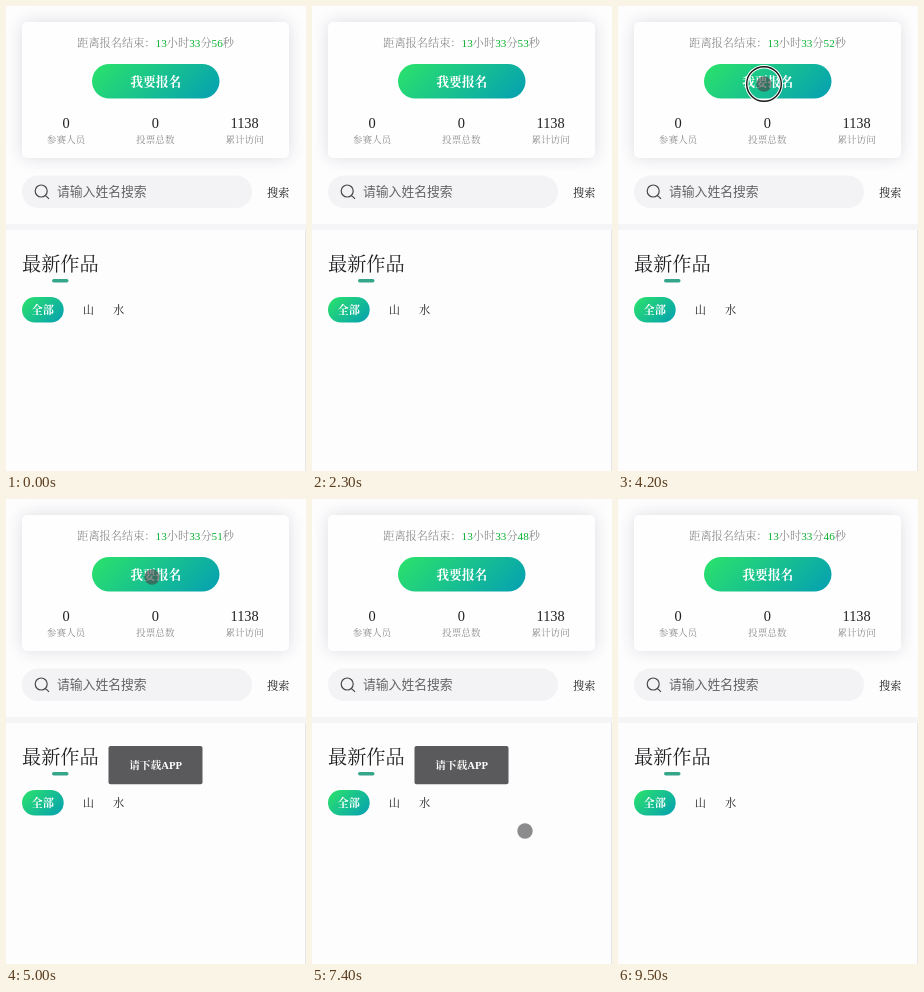
These frames come from a looping animation (300 by 465 pixels, 9600 ms). An HTML page with a canvas:

```html
<!DOCTYPE html>
<html lang="zh-CN">
<head>
<meta charset="utf-8">
<style>
html, body { margin: 0; width: 100%; height: 100%; overflow: hidden; background: #fdfdfe; }
canvas { display: block; width: 300px; height: 465px; }
</style>
</head>
<body>
<canvas id="stage"></canvas>
<script>
const W = 300, H = 465, LOOP = 9600, STEP = 100;
const SERIF = '"Liberation Serif", "Noto Serif CJK SC", "Noto Sans CJK SC", "Noto Sans CJK", serif';
const SANS = '"Noto Sans CJK SC", "Noto Sans CJK", sans-serif';
const INK = '#202022', GREY = '#8b8b8e';

const canvas = document.getElementById('stage');
const ctx = canvas.getContext('2d');
const ratio = window.devicePixelRatio || 1;
canvas.width = W * ratio;
canvas.height = H * ratio;
ctx.scale(ratio, ratio);

// Pointer stops: time, x, y
const enter = [[2800, 194, 406], [2900, 190, 388], [3000, 178, 284], [3100, 161, 146], [3200, 151, 78]];
const leave = [[7000, 146, 78], [7200, 176, 196], [7400, 213, 332], [7900, 223, 420], [8200, 236, 464], [8400, 241, 482]];

function along(path, t) {
  if (t <= path[0][0]) return path[0].slice(1);
  for (let i = 1; i < path.length; i++) {
    const [t0, x0, y0] = path[i - 1], [t1, x1, y1] = path[i];
    if (t <= t1) {
      const k = (t - t0) / (t1 - t0);
      return [x0 + (x1 - x0) * k, y0 + (y1 - y0) * k];
    }
  }
  return path[path.length - 1].slice(1);
}

function box(x, y, w, h, r, fill) {
  ctx.fillStyle = fill;
  ctx.beginPath();
  ctx.roundRect(x, y, w, h, r);
  ctx.fill();
}

function disc(x, y, r) {
  ctx.beginPath();
  ctx.arc(x, y, r, 0, Math.PI * 2);
}

// y is the vertical middle of the line
function text(str, x, y, size, color, { align = 'center', weight = 400, family = SERIF } = {}) {
  ctx.font = `${weight} ${size}px ${family}`;
  ctx.textAlign = align;
  ctx.fillStyle = color;
  ctx.fillText(str, x, y + size * 0.37);
}

function greenFill(x, y, w, h) {
  const cx = x + w / 2, cy = y + h / 2, d = (w + h) / 4;
  const g = ctx.createLinearGradient(cx - d, cy - d, cx + d, cy + d);
  g.addColorStop(0, '#2be36a');
  g.addColorStop(1, '#059fb3');
  return g;
}

function pill(x, y, w, h) {
  box(x, y, w, h, h / 2, greenFill(x, y, w, h));
}

function drawCountdown(t) {
  const size = 11.2;
  const seconds = 56 - Math.floor((t + 700) / 1000);
  const parts = [['距离报名结束：', 7], ['13', 1], ['小时', 2], ['33', 1], ['分', 1], [String(seconds), 1], ['秒', 1]];
  let x = 71.2;
  parts.forEach(([str, ems], i) => {
    text(str, x, 37.3, size, i % 2 ? '#08b02f' : GREY, { align: 'left' });
    x += ems * size;
  });
}

function drawCard(t) {
  ctx.save();
  ctx.shadowColor = 'rgba(40, 40, 60, 0.15)';
  ctx.shadowBlur = 16 * ratio;
  box(16, 16, 267, 136, 5, '#fefefe');
  ctx.restore();
  drawCountdown(t);
  pill(86, 58, 127.5, 34.5);
  text('我要报名', 149.8, 75.3, 12.8, '#fff', { weight: 700 });
  [['0', '参赛人员', 60], ['0', '投票总数', 149.3], ['1138', '累计访问', 238.6]].forEach(([num, label, x]) => {
    text(num, x, 116.3, 14.4, INK);
    text(label, x, 133.2, 9.6, GREY);
  });
}

function drawSearch() {
  box(16, 169.5, 230, 32.5, 16.25, '#f3f3f5');
  ctx.strokeStyle = '#48484b';
  ctx.lineWidth = 1.2;
  disc(35.2, 185, 6);
  ctx.moveTo(39.5, 189.3);
  ctx.lineTo(43, 192.8);
  ctx.stroke();
  text('请输入姓名搜索', 51, 185.7, 12.8, '#636366', { align: 'left', family: SANS });
  text('搜索', 272.2, 186.4, 11.2, INK);
}

function drawWorks() {
  box(0, 218, W, 6, 0, '#f5f4f6');
  text('最新作品', 16, 257.8, 19.2, INK, { align: 'left', weight: 500 });
  box(46, 273, 16.5, 3.4, 1.7, '#35a68a');
  pill(16, 291, 41.7, 25.6);
  text('全部', 36.8, 304, 11.2, '#fff', { weight: 700 });
  text('山', 82.3, 304, 11.2, INK);
  text('水', 112.7, 304, 11.2, INK);
  box(299, 224, 1, H - 224, 0, '#e6e6e8');
}

function drawToast() {
  box(102.5, 247, 94, 38.3, 2, '#5a595b');
  text('请下载APP', 149.6, 266.3, 10.7, '#fff', { weight: 700 });
}

function drawArrow(x, y) {
  ctx.beginPath();
  [[0, 0], [0, 11], [2.5, 8.8], [4.3, 12.8], [6.3, 11.9], [4.6, 8], [8, 8]]
    .forEach(([dx, dy]) => ctx.lineTo(x + dx, y + dy));
  ctx.closePath();
  ctx.fillStyle = '#111';
  ctx.strokeStyle = '#fff';
  ctx.lineWidth = 1;
  ctx.fill();
  ctx.stroke();
}

function drawTouch(x, y) {
  disc(x, y, 7.7);
  ctx.fillStyle = 'rgba(70, 68, 70, 0.62)';
  ctx.fill();
}

function drawRing(x, y) {
  [['#fff', 3.4], ['#171717', 1.4]].forEach(([color, width]) => {
    disc(x, y, 17.3);
    ctx.strokeStyle = color;
    ctx.lineWidth = width;
    ctx.stroke();
  });
}

function drawPointer(t) {
  if (t >= 2800 && t < 3500) drawArrow(...along(enter, t));
  else if (t >= 3500 && t < 8500) {
    const [x, y] = along(leave, t);
    drawTouch(x, y);
    if (t >= 4100 && t < 4400) drawRing(x, y);
  }
}

function draw(now) {
  const t = Math.floor((now % LOOP) / STEP) * STEP;
  ctx.fillStyle = '#fdfdfe';
  ctx.fillRect(0, 0, W, H);
  drawCard(t);
  drawSearch();
  drawWorks();
  if (t >= 4500 && t < 7600) drawToast();
  drawPointer(t);
}

let start;
function loop(now) {
  start ??= now;
  draw(Math.max(0, now - start));
  requestAnimationFrame(loop);
}
requestAnimationFrame(loop);
</script>
</body>
</html>
```
